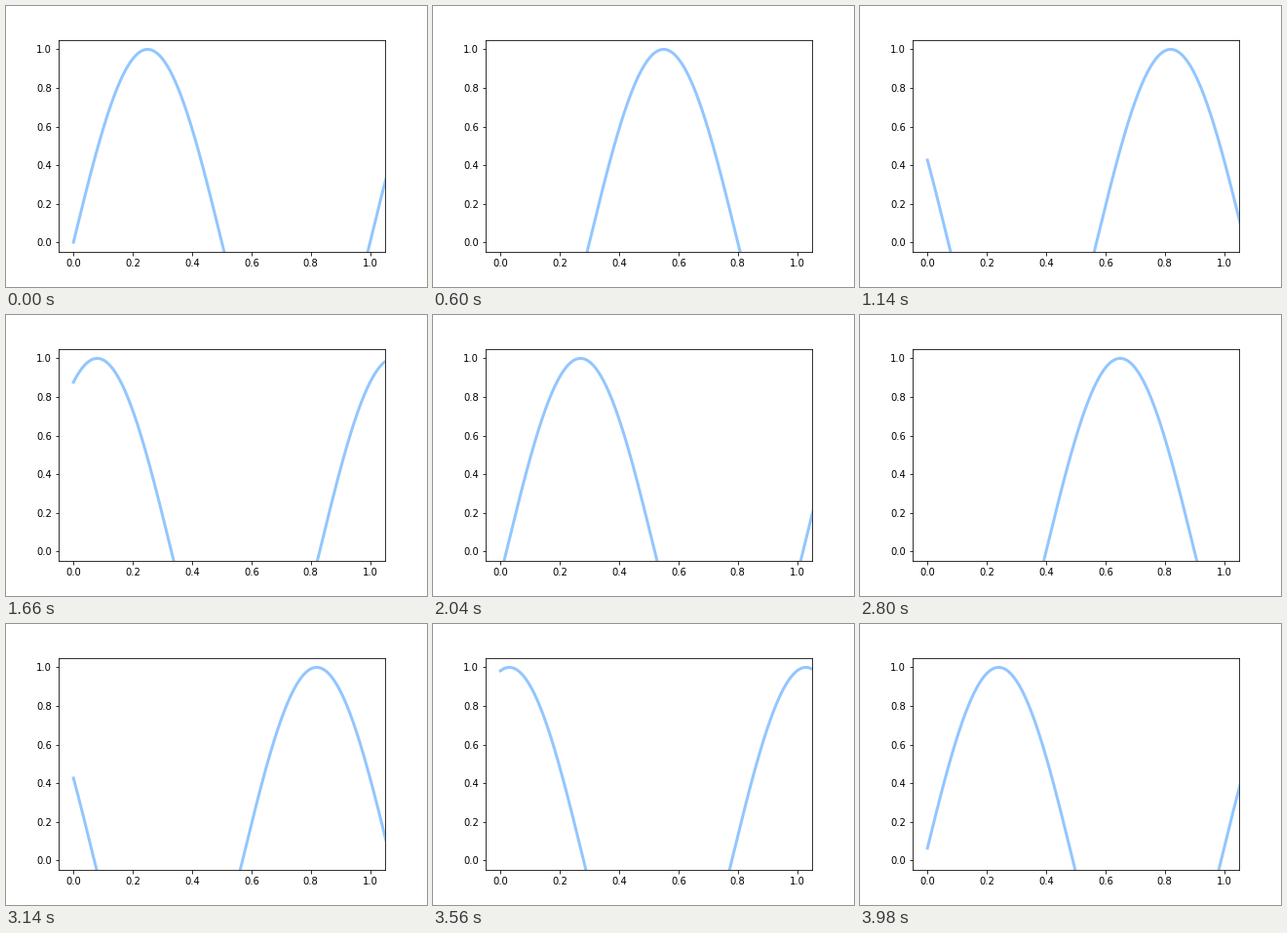
Recreate the animation shown at these times as a matplotlib script. Size 432 by 288 pixels, loop 4 s.

```python
import numpy as np
import matplotlib.pyplot as plt
from matplotlib.animation import FuncAnimation

FRAMES = 200
INTERVAL = 20
SPEED = 0.01  # wave shift per frame, in x units

plt.rcParams["font.family"] = "DejaVu Sans"

fig = plt.figure(figsize=(6, 4), dpi=72, facecolor="white")
ax = fig.add_axes([0.125, 0.125, 0.775, 0.755])
ax.set_xlim(-0.05, 1.05)
ax.set_ylim(-0.05, 1.05)

x = np.linspace(0, 2, 1000)
line, = ax.plot([], [], lw=3, color="#92C6FF")


def update(i):
    line.set_data(x, np.sin(2 * np.pi * (x - SPEED * i)))
    return line,


anim = FuncAnimation(fig, update, frames=FRAMES, init_func=lambda: update(0),
                     interval=INTERVAL, repeat=True, repeat_delay=0, blit=False)
plt.show()
```
